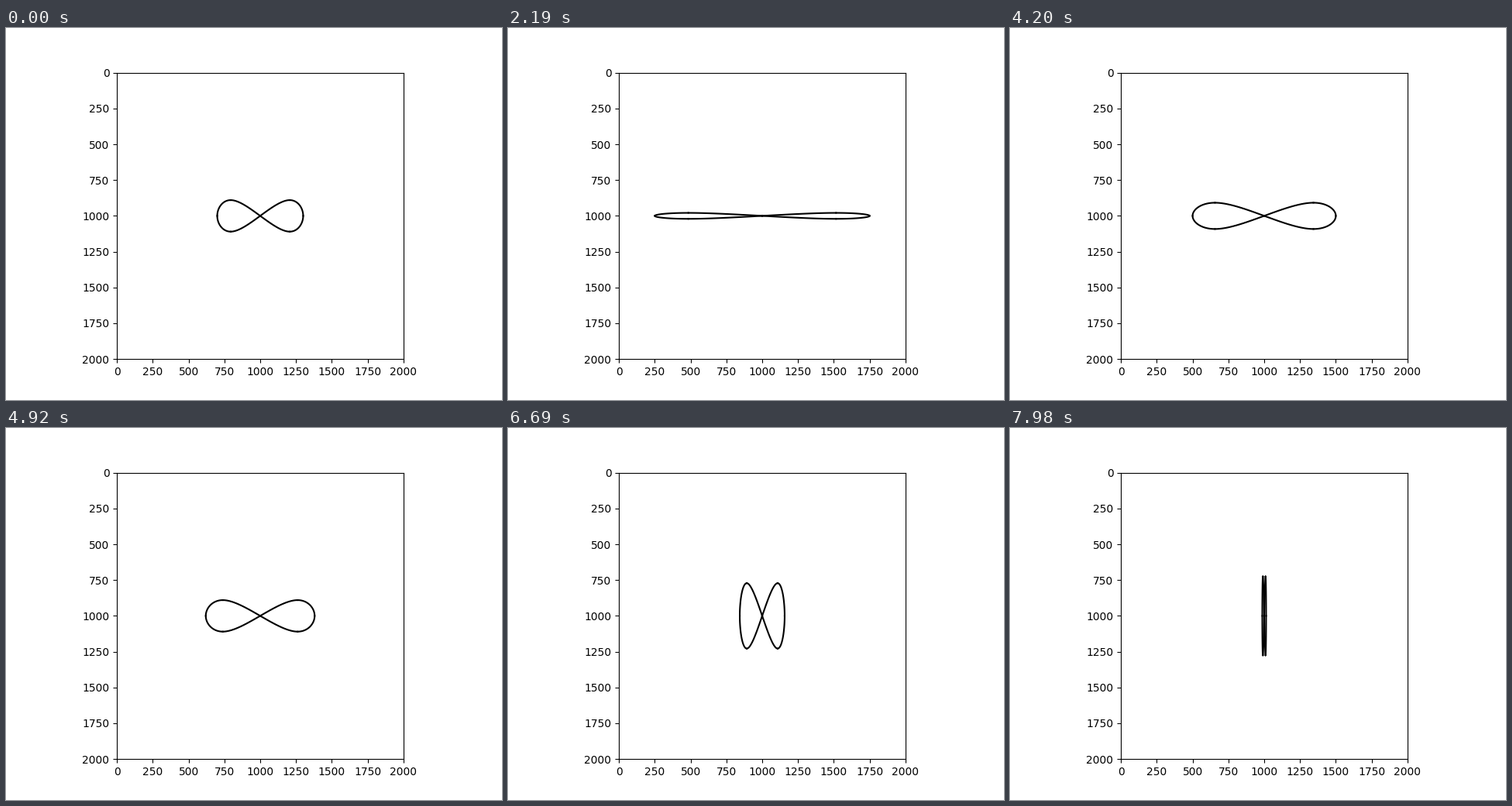
Recreate the animation shown at these times as a matplotlib script. Size 640 by 480 pixels, loop 8000 ms.

```python
import numpy as np
import matplotlib.pyplot as plt
from matplotlib.animation import FuncAnimation

LOOP_MS = 8000
FRAMES = 267
CENTER = 1000
WIDE, NARROW = 750, 300
TALL, LOW = 275, 110


def swell(u):
    """Cubic that rises from 0 to 1 and levels off there."""
    return (3 * u - u ** 3) / 2


def half_arm(start):
    """Half of one arm: crossing to crest, or crest to outer tip."""
    s = np.linspace(start, start + 0.5, 40)
    return swell(s), swell(1 - abs(1 - 2 * s))


def half_width(step):
    return np.interp(step, [0, 60, 90, 180, 270],
                     [NARROW, WIDE, WIDE, NARROW, 0])


def half_height(step):
    return np.interp(step, [0, 90, 150, 180, 240],
                     [LOW, 0, LOW, LOW, TALL])


fig, ax = plt.subplots(figsize=(6.4, 4.8), dpi=100)
ax.set(xlim=(0, 2000), ylim=(2000, 0), aspect="equal")

pieces = []
for start in (0, 0.5):
    x, y = half_arm(start)
    for sx in (-1, 1):
        for sy in (-1, 1):
            line, = ax.plot([], [], color="black", lw=1.5)
            pieces.append((line, sx * x, sy * y))


def update(step):
    width, height = half_width(step), half_height(step)
    for line, x, y in pieces:
        line.set_data(CENTER + width * x, CENTER + height * y)
    return [line for line, _, _ in pieces]


def init():
    return update(0)


anim = FuncAnimation(fig, update, frames=FRAMES, init_func=init,
                     interval=LOOP_MS / FRAMES, repeat=True, repeat_delay=0)
plt.show()
```
